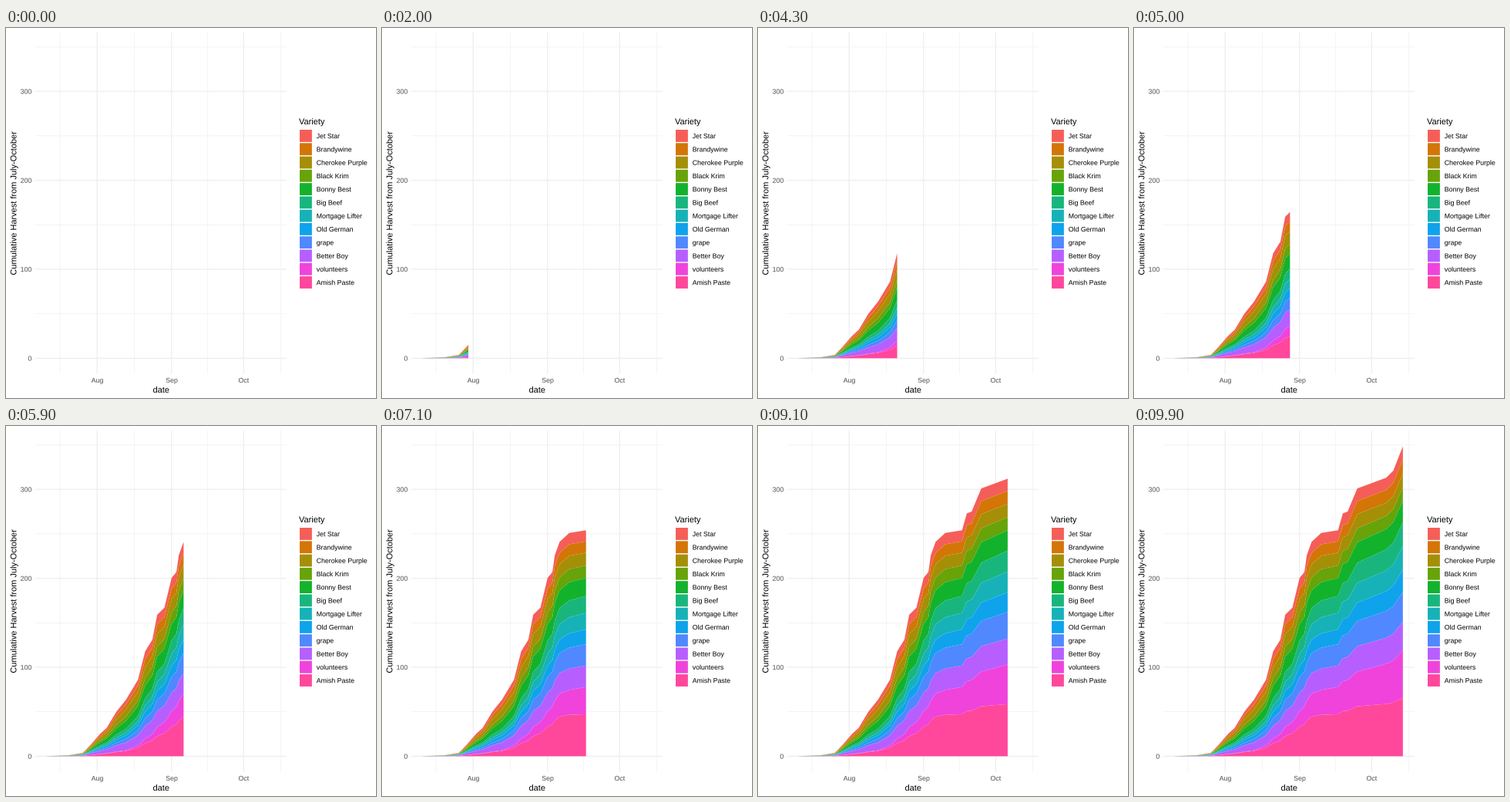
Write a matplotlib script that moves like this. It is 480 px wide and 480 px high and loops after 10 s.

```python
import numpy as np
import matplotlib.pyplot as plt
from matplotlib.animation import FuncAnimation
from matplotlib.patches import PathPatch, Polygon, Rectangle
from matplotlib.textpath import TextPath
from matplotlib.transforms import Affine2D

plt.rcParams["font.family"] = "Liberation Sans"

SIZE, DPI = 480, 72          # one point equals one pixel
FRAMES, LAST_DAY = 100, 95
LEFT, RIGHT, TOP, BOTTOM = 38, 363.6, 5.5, 448.5
X0, PX_DAY = 52.8, 3.116
Y0, PX_UNIT = 428.4, 1.154
KEY, KEY_TOP = 17.28, 131.3

# Turning points of the total harvest: (day, amount)
TURNS = [(0, 0.1), (9, 1), (15, 3.7), (18, 12), (22, 24.5), (25, 32), (29, 50),
         (33, 63.5), (38, 86), (41, 118), (44, 131), (46, 159), (49, 167),
         (52, 200.5), (54, 207), (55, 226), (57, 241), (61, 251), (68, 254),
         (70, 273), (72, 275), (76, 301), (88, 313), (91, 321), (95, 348.4)]

# Name, colour and percent of the total early, midway and at the end
MIX_DAYS = (33, 57, 95)
VARIETIES = [
    ("Jet Star", "#f55e58", (8.7, 5.2, 4.2)),
    ("Brandywine", "#d37607", (8.7, 5.2, 4.5)),
    ("Cherokee Purple", "#a58f07", (12.6, 6.2, 4.4)),
    ("Black Krim", "#67a309", (7.9, 6.0, 4.4)),
    ("Bonny Best", "#13b22c", (14.2, 8.3, 7.0)),
    ("Big Beef", "#18b67d", (6.3, 7.5, 7.6)),
    ("Mortgage Lifter", "#16b2b8", (5.5, 7.2, 7.5)),
    ("Old German", "#0fa3ec", (6.3, 6.3, 7.3)),
    ("grape", "#4f88ff", (6.3, 9.3, 9.6)),
    ("Better Boy", "#b75eff", (14.0, 9.6, 9.3)),
    ("volunteers", "#ef43dc", (1.2, 10.7, 15.2)),
    ("Amish Paste", "#ff479c", (9.4, 18.5, 18.8)),
]

days = np.arange(LAST_DAY + 1)
total = np.interp(days, *zip(*TURNS))
parts = np.array([np.interp(days, MIX_DAYS, mix) for _, _, mix in VARIETIES])
parts *= total / parts.sum(axis=0)


def x_at(day):
    return X0 + PX_DAY * day


def y_at(amount):
    return Y0 - PX_UNIT * amount


# Row k is the upper edge of layer k, row k + 1 its lower edge
xs = x_at(days)
edges = y_at(np.vstack([total, total - np.cumsum(parts, axis=0)]))

fig = plt.figure(figsize=(SIZE / DPI, SIZE / DPI), dpi=DPI, facecolor="white")
ax = fig.add_axes([0, 0, 1, 1])
ax.set_xlim(0, SIZE)
ax.set_ylim(SIZE, 0)
ax.axis("off")


def grid(x_lines, y_lines, width):
    style = dict(color="#ebebeb", lw=width, zorder=1, snap=False,
                 solid_capstyle="butt")
    for x in x_lines:
        ax.plot([x, x], [TOP, BOTTOM], **style)
    for y in y_lines:
        ax.plot([LEFT, RIGHT], [y, y], **style)


def label(x, y, text, size=8.8, color="black", align=0, angle=0):
    """Set text on a baseline; align is 0 left, 0.5 centre, 1 right."""
    path = TextPath((0, 0), text, size=size)
    place = (Affine2D().translate(-align * path.get_extents().x1, 0)
             .rotate_deg(angle).scale(1, -1).translate(x, y))
    ax.add_patch(PathPatch(place.transform_path(path), fc=color, lw=0, snap=False))


months = {"Aug": 21, "Sep": 52, "Oct": 82}
ticks = range(0, 400, 100)
grid([x_at(d) for d in (5.5, 36.5, 67, 97.5)], [y_at(t + 50) for t in ticks], 0.53)
grid([x_at(d) for d in months.values()], [y_at(t) for t in ticks], 1.07)

for name, day in months.items():
    label(x_at(day), 460, name, color="#4d4d4d", align=0.5)
for t in ticks:
    label(33, y_at(t) + 3.2, str(t), color="#4d4d4d", align=1)
label(201, 473, "date", 11, align=0.5)
label(13.4, 227.5, "Cumulative Harvest from July-October", 11, align=0.5, angle=90)
label(380, 125, "Variety", 11)

areas = []
for k, (name, color, _) in enumerate(VARIETIES):
    mid = KEY_TOP + KEY * (k + 0.5)
    side = KEY - 1.42
    ax.add_patch(Rectangle((381, mid - side / 2), side, side, fc=color, lw=0,
                           snap=False))
    label(402.7, mid + 3.2, name)
    area = Polygon([[X0, Y0]] * 3, fc=color, lw=0, zorder=2, snap=False)
    areas.append(ax.add_patch(area))


def update(i):
    n = round(i * LAST_DAY / (FRAMES - 1)) + 1
    outline_x = np.concatenate([xs[:n], xs[:n][::-1]])
    for area, upper, lower in zip(areas, edges, edges[1:]):
        outline_y = np.concatenate([upper[:n], lower[:n][::-1]])
        area.set_xy(np.column_stack([outline_x, outline_y]))
    return areas


anim = FuncAnimation(fig, update, frames=FRAMES, interval=100, repeat=True,
                     repeat_delay=0, blit=False)
plt.show()
```
